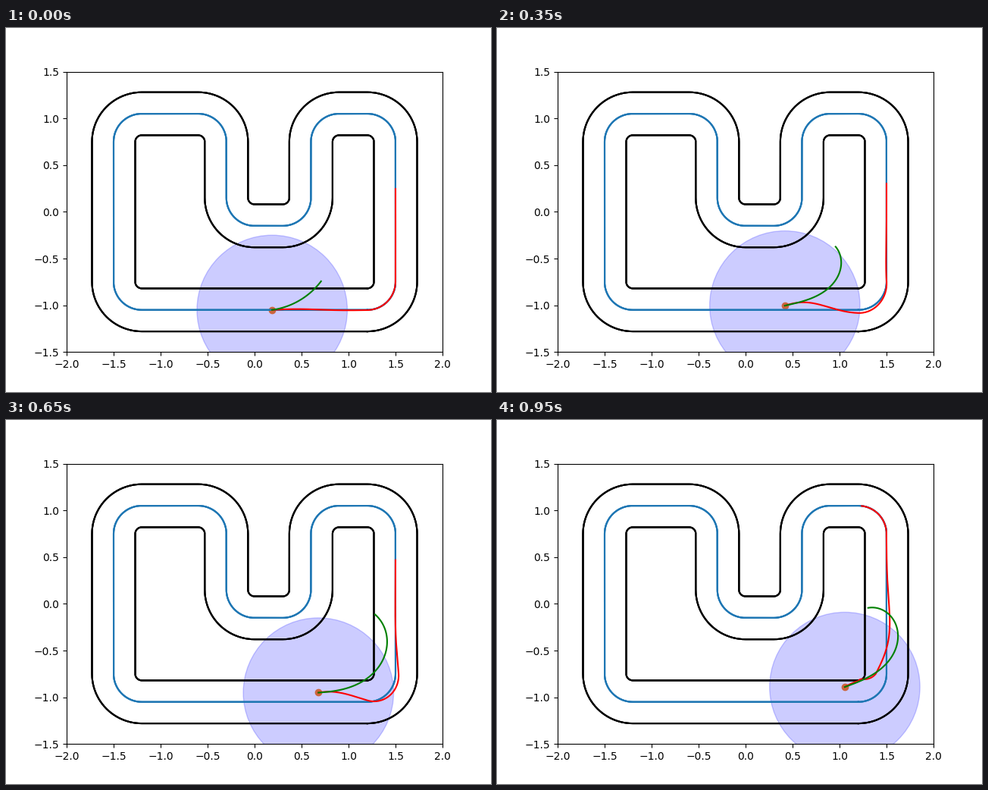
A matplotlib script that plays this animation: 640 px wide and 480 px high, repeating every 1 s.

```python
import numpy as np
import matplotlib.pyplot as plt
from matplotlib.animation import FuncAnimation
from matplotlib.patches import Circle

FRAMES, INTERVAL = 20, 50
RADIUS, HALF_WIDTH = 0.3, 0.23
BOTTOM, CORNER_X, SIDE = -1.05, 1.2, 1.5
LAPS = 3  # repeated laps harden the antialiased line edges

# Corners of the centre line, anticlockwise, before rounding.
CORNERS = [(1.5, -1.05), (1.5, 1.05), (0.6, 1.05), (0.6, -0.15),
           (-0.3, -0.15), (-0.3, 1.05), (-1.5, 1.05), (-1.5, -1.05)]

# Key steps: plan swing and length; sample length, first heading, turn, power.
KEYS = np.array([
    (0, 0.01, 2.48, 0.62, 8, 45, 1.0),
    (2, 0.045, 2.48, 0.62, 12, 45, 2.0),
    (5, 0.065, 2.28, 0.67, 18, 45, 1.5),
    (9, 0.08, 2.33, 1.34, 7, 190, 2.6),
    (13, 0.05, 2.21, 1.34, 4, 135, 1.6),
    (16, 0.19, 2.64, 1.34, 14, 175, 2.2),
    (19, 0.21, 2.55, 1.34, 20, 170, 1.9),
])


def track_line(offset):
    """Closed line parallel to the centre line; positive offsets lie outside."""
    corners = np.array(CORNERS)
    into = corners - np.roll(corners, 1, axis=0)
    into /= np.linalg.norm(into, axis=1)[:, None]
    out = np.roll(into, -1, axis=0)
    points = []
    for corner, a, b in zip(corners, into, out):
        turn = np.sign(a[0] * b[1] - a[1] * b[0])
        center = corner + RADIUS * (b - a)
        r = RADIUS + turn * offset
        for t in np.linspace(0, np.pi / 2, 25):
            points.append(center + r * (a * np.sin(t) - b * np.cos(t)))
    return np.array(points + points[:1]).T


def trace(start, heading, dist):
    """Points reached by driving from start with the given headings."""
    step = np.diff(dist)
    mid = (heading[1:] + heading[:-1]) / 2
    x = start[0] + np.concatenate([[0], np.cumsum(step * np.cos(mid))])
    y = start[1] + np.concatenate([[0], np.cumsum(step * np.sin(mid))])
    return np.array([x, y])


def car_position(step):
    return np.array([0.187 + 0.031 * step + 4.08e-5 * step**3,
                     BOTTOM + 0.16 * (step / 19)**1.25])


def plan_path(pos, swing, length):
    """Follow the centre line while the sideways error swings and dies out."""
    dist = np.linspace(0, length, 300)
    quarter = RADIUS * np.pi / 2
    past = dist - (CORNER_X - pos[0])
    heading = (np.clip(past, 0, quarter)
               + np.clip(past - quarter - SIDE, 0, quarter)) / RADIUS
    error = pos[1] - BOTTOM
    phase = max(2.8, 5.4 - 19 * error) * dist
    offset = (error * np.cos(phase) + swing * np.sin(phase)) * np.exp(-(dist / 0.9)**2)
    center = trace((pos[0], BOTTOM), heading, dist)
    return center + offset * np.array([-np.sin(heading), np.cos(heading)])


def sample_path(pos, length, first, turn, power):
    """A path that bends left more and more."""
    u = np.linspace(0, 1, 120)
    return trace(pos, np.radians(first + turn * u**power), length * u)


fig, ax = plt.subplots(figsize=(6.4, 4.8), dpi=100)
ax.set_xlim(-2, 2)
ax.set_ylim(-1.5, 1.5)
for offset, color in [(0, "C0"), (HALF_WIDTH, "black"), (-HALF_WIDTH, "black")]:
    for _ in range(LAPS):
        ax.plot(*track_line(offset), color=color)
car = ax.scatter([], [], color="C1", zorder=0.9)
reach = ax.add_patch(Circle((0, 0), 0.8, color="blue", alpha=0.2))
plan, = ax.plot([], [], color="red")
sample, = ax.plot([], [], color="green")


def draw(step):
    pos = car_position(step)
    swing, length, *bend = [np.interp(step, KEYS[:, 0], column)
                            for column in KEYS[:, 1:].T]
    car.set_offsets([pos])
    reach.center = tuple(pos)
    plan.set_data(*plan_path(pos, swing, length))
    sample.set_data(*sample_path(pos, *bend))
    return car, reach, plan, sample


anim = FuncAnimation(fig, draw, frames=FRAMES, interval=INTERVAL,
                     init_func=lambda: draw(0), repeat=True, repeat_delay=0)
plt.show()
```
